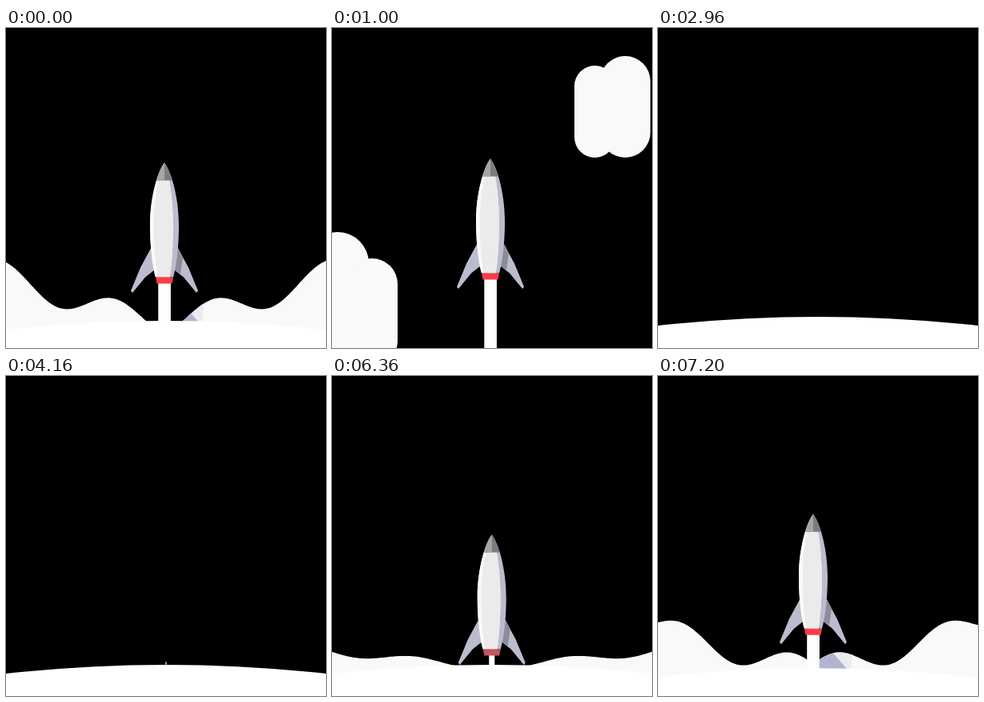
An HTML page with a canvas that plays this animation: 400x400 px, repeating every 7240 ms.

```html
<!DOCTYPE html>
<html lang="en">
<head>
<meta charset="utf-8">
<title>Rocket launch</title>
<style>
html, body { margin: 0; width: 100%; height: 100%; overflow: hidden; background: #000; }
canvas { display: block; width: 100vmin; height: 100vmin; }
</style>
</head>
<body>
<canvas id="stage" width="400" height="400"></canvas>
<script>
const ctx = document.getElementById('stage').getContext('2d');
const LOOP = 7240, START = 2960;
const APPEAR = 4160, IGNITE = 5520, LIFT = 6360, CLIMB = LOOP, ESCAPE = 8240;

const lerp = (a, b, k) => a + (b - a) * k;
const span = (t, a, b) => Math.min(1, Math.max(0, (t - a) / (b - a)));

function poly(color, ...p) {
  ctx.fillStyle = color;
  ctx.beginPath();
  for (let i = 0; i < p.length; i += 2) ctx.lineTo(p[i], p[i + 1]);
  ctx.fill();
}

function rect(color, x, y, w, h) {
  ctx.fillStyle = color;
  ctx.fillRect(x, y, w, h);
}

function pill(color, x, y, w, h, r = w / 2) {
  ctx.fillStyle = color;
  ctx.beginPath();
  ctx.roundRect(x, y, w, h, r);
  ctx.fill();
}

// Hull outline; l and r narrow its left and right halves
function hull(color, l, r) {
  ctx.fillStyle = color;
  ctx.beginPath();
  for (const s of [-l, r]) {
    ctx.moveTo(0, 0);
    ctx.bezierCurveTo(8 * s, 10, 18 * s, 42, 18 * s, 78);
    ctx.bezierCurveTo(18 * s, 105, 15 * s, 130, 11 * s, 143);
    ctx.lineTo(0, 143);
  }
  ctx.fill();
}

function rocket(x, y, sx, sy, heat) {
  ctx.save();
  ctx.translate(x, y);
  ctx.scale(sx, sy);
  for (const s of [-1, 1])
    poly('#bcbccf', 16 * s, 105, 30 * s, 131, 42 * s, 160, 40 * s, 162.5, 24 * s, 143, 10 * s, 132);
  poly('#8c8c98', 15, 105, 18, 108, 23, 118, 20, 139, 10, 132);

  hull('#bcbccf', 1, 1);
  hull('#fafafa', 1, 0.6);
  hull('#ebebeb', 0.74, 0.6);

  ctx.save();
  ctx.beginPath();
  ctx.rect(-20, 0, 40, 22);
  ctx.clip();
  hull('#7c7c7c', 1, 1);
  hull('#a6a6a6', 1, 0);
  ctx.restore();

  const tone = [119, 119, 127].map((c, i) => lerp(c, [250, 60, 72][i], heat));
  poly(`rgb(${tone})`, -11, 143, 11, 143, 9.5, 151, -9.5, 151);
  ctx.restore();
}

function ground(x, y) {
  ctx.fillStyle = '#fff';
  ctx.beginPath();
  ctx.arc(x, y + 1818, 1818, 0, 7);
  ctx.fill();
}

// Waves rolling outward from the rocket, on a bank that rises with distance
function smoke(t, x0, base) {
  const size = Math.pow((t - IGNITE) / 1680, 1.74);
  const crest = 26 + 0.9 * (t - 7200);
  ctx.save();
  ctx.beginPath();
  ctx.moveTo(0, 800);
  for (let x = 0; x <= 400; x += 2) {
    const d = Math.abs(x - x0);
    const wave = 15 * Math.cos(2 * Math.PI * (d - crest) / 138);
    ctx.lineTo(x, base - size * (0.14 * d + 0.0007 * d * d + wave));
  }
  ctx.lineTo(400, 800);
  ctx.clip();
  rect('#f9f9f9', 0, 0, 400, 400);

  // The rocket's shadow falls on the smoke
  ctx.translate(x0, base);
  poly('#ececf0', 0, -25, 50, -25, 47, 2, 0, 2);
  poly('#b2b5d0', 0, -20, 24, -20, 43, 2, 0, 2);
  ctx.restore();
}

function clouds(fall) {
  pill('#f9f9f9', 303, 46 + fall, 51, 115);
  pill('#f9f9f9', 335, 34 + fall, 63, 127);
  pill('#f9f9f9', -32, 254 + fall, 78, 180);
  pill('#f9f9f9', 18, 287 + fall, 64, 135);
}

function trail(t, x, top, bottom) {
  const w = Math.min(lerp(7, 15.5, span(t, LIFT, 7100)), 7 * Math.exp((8880 - t) / 300));
  if (w < 0.6) return;
  rect('#fff', x - w / 2, top, w, bottom - top);
  if (w > 8) rect('#f5f5f5', x + w * 0.3, top, w * 0.2, bottom - top);
}

function pad(height, width) {
  ctx.save();
  ctx.translate(199.5, 362);
  ctx.scale(width, height);
  rect('#fff', -4, -14, 8, 14);
  pill('#fff', -15, -8, 30, 8, [4, 4, 0, 0]);
  ctx.restore();
}

function draw(now) {
  // One run goes from the bare ground to the fading trail
  const local = now % LOOP, t = local < START ? local + LOOP : local;
  rect('#000', 0, 0, 400, 400);

  const thrust = Math.pow(span(t, LIFT, CLIMB), 3.3);
  const drop = 0.001 * Math.max(0, t - CLIMB) ** 2;
  const escape = Math.pow(Math.max(0, t - ESCAPE) / 580, 3);
  const shake = 7 * Math.max(thrust, 0.1 * span(t, IGNITE, 5800)) * (1 - span(t, ESCAPE, 8800));
  const x = 200 - shake * Math.cos(2 * Math.PI * (t - 7200) / 200);
  const y = 198.5 - 30 * thrust - 5 * span(t, CLIMB, ESCAPE) - 328 * escape;
  const floor = 361 + 5 * thrust + drop;

  if (t > IGNITE && drop < 500) smoke(t, x, floor);
  if (drop > 100) clouds(t - ESCAPE);
  if (t >= IGNITE) trail(t, x, Math.max(0, y + 149), Math.min(400, floor + 1));

  if (t >= APPEAR) {
    const u = span(t, APPEAR - 5, 4880);
    const sy = 1 - Math.pow(1 - u, 3);
    const sx = sy + 0.65 * Math.pow(Math.sin(Math.PI * u), 2);
    pad(sy * (1 - span(t, IGNITE, 5900)), sx);
    rocket(x, y + 162.5 * (1 - sy), sx, sy, span(t, IGNITE, 7000));
  }

  ground(x, floor);
}

function tick() {
  draw(performance.now());
  requestAnimationFrame(tick);
}
tick();
</script>
</body>
</html>
```
